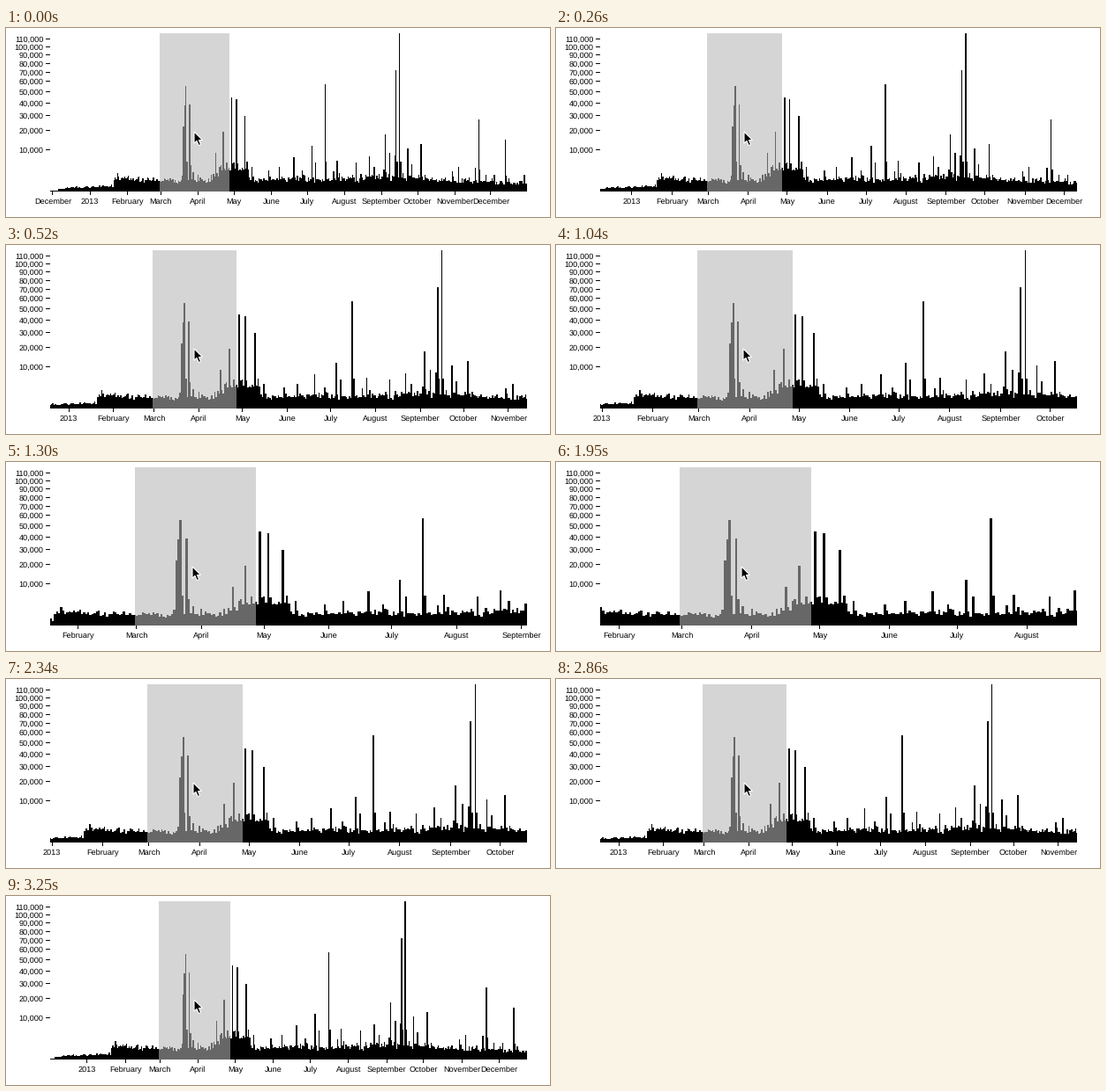
These frames come from a looping animation (616 px wide and 215 px high, 4450 ms). A matplotlib script:

```python
import numpy as np
import matplotlib.pyplot as plt
from matplotlib.animation import FuncAnimation
from matplotlib.patches import Polygon, Rectangle

W, H, DPI = 616, 215, 100
LEFT, RIGHT, TOP, BASE = 50, 590, 6, 185.5
TICK_MS, STEP_MS, LOOP_MS = 10, 130, 4450
LAST_STEP, TURN = 25, 13
FOCUS_X, FOCUS_DAY = 212.2, 86.2   # zoom keeps this day under the pointer
BRUSH = np.array([58.1, 116.25])   # days since 1 January 2013
LINE = dict(color="black", lw=72 / DPI, antialiased=False,
            solid_capstyle="butt", snap=False)

plt.rcParams.update({
    "font.family": "Liberation Sans",
    "font.size": 9.2 * 72 / DPI,
    "text.hinting": "none",
})

MONTH_NAMES = ("January February March April May June July August "
               "September October November December").split()

# Busiest days and the tops of their bars in pixels.
PEAKS = {78: 112, 79: 88, 80: 66, 83: 87, 111: 118, 118: 79, 122: 81,
         129: 100, 185: 134, 196: 63.5, 246: 121, 255: 48.5, 258: TOP,
         276: 132, 324: 104.5, 346: 127}


def month_starts():
    """Yield (day, label) for each month from December 2012 on."""
    months = np.arange("2012-12", "2014-01", dtype="datetime64[M]")
    offsets = months.astype("datetime64[D]") - np.datetime64("2013-01-01")
    for month, day in zip(months.astype(int), offsets.astype(int)):
        yield day, MONTH_NAMES[month % 12] if month % 12 else str(1970 + month // 12)


def bar_tops(days):
    """Slowly varying level with noise, random busy days and the known peaks."""
    rng = np.random.default_rng(7)
    level = np.interp(days, [-26, -14, 19, 21, 60, 98, 113, 128, 135, 200, 250, 300, 366],
                      [2.5, 4.5, 6, 15, 12, 13, 27, 26, 13, 14, 17, 12, 9])
    heights = level * np.exp(rng.normal(0, .16, days.size))
    busy = (days > 85) & (rng.random(days.size) < .1)
    heights[busy] *= rng.uniform(1.3, 2.5, busy.sum())
    for day, top in PEAKS.items():
        i = day - days[0]
        heights[i] = BASE - top
        if day + 1 not in PEAKS:
            heights[i + 1] = max(heights[i + 1], min(.3 * heights[i], 34))
    return np.round(BASE - heights)


def zoom_scale(level):
    """Pixels per day: one soft scroll, then a faster one that eases out."""
    u = np.clip(level / 8, 0, 1) ** .824
    v = np.clip((level - 8) / 5, 0, 1)
    return np.exp(.3067 + .313 * u * u * (3 - 2 * u) + .379 * (1 - (1 - v) ** 2))


def value_y(value):
    return BASE - 47.5 * (value / 10000) ** .538


def to_x(day, scale):
    return FOCUS_X + scale * (day - FOCUS_DAY)


def segments(pairs):
    """Flatten line segments into one path with gaps."""
    xs, ys = [], []
    for (x0, y0), (x1, y1) in pairs:
        xs += [x0, x1, np.nan]
        ys += [y0, y1, np.nan]
    return xs, ys


days = np.arange(-26, 367)
tops = bar_tops(days)
columns = np.arange(LEFT, RIGHT)
column_edges = np.repeat(np.arange(LEFT, RIGHT + 1), 2)
months = list(month_starts())

fig = plt.figure(figsize=(W / DPI, H / DPI), dpi=DPI, facecolor="white")
ax = fig.add_axes([0, 0, 1, 1])
ax.set(xlim=(0, W), ylim=(H, 0))
ax.axis("off")

bars = ax.add_patch(Polygon([(0, 0)] * 3, fc="black", ec="none",
                            antialiased=False, snap=False))
brush = ax.add_patch(Rectangle((0, TOP), 1, 180, fc="#b6b6b6", ec="none",
                               alpha=.57, antialiased=False, zorder=3))
ax.plot([LEFT, RIGHT], [BASE, BASE], **LINE)
month_ticks, = ax.plot([], [], **LINE)

values = range(10000, 110001, 10000)
rows = [np.floor(value_y(v)) + .5 for v in values]
ax.plot(*segments([((45, y), (50, y)) for y in rows]), **LINE)
for value, y in zip(values, rows):
    ax.text(42.5, y + 3.3, f"{value:,}", ha="right", va="baseline")
labels = [ax.text(0, 200, name, ha="center", va="baseline") for _, name in months]

ARROW = np.array([(0, 0), (0, 13.2), (3, 10.4), (5.2, 15.6), (7.6, 14.6),
                  (5.4, 9.5), (9.5, 9.5)])
pointer = ax.add_patch(Polygon(ARROW, fc="black", ec="white", lw=.8, zorder=5))


def draw(frame):
    step = min(frame * TICK_MS // STEP_MS, LAST_STEP)
    level = TURN - abs(TURN - step)
    scale = zoom_scale(level)

    # One bar top per pixel column keeps narrow bars crisp.
    index = np.round(FOCUS_DAY + (columns + .5 - FOCUS_X) / scale).astype(int) - days[0]
    column_tops = np.where(index < 0, BASE + .5, tops[np.clip(index, 0, days.size - 1)])
    outline = np.concatenate([[186], np.repeat(column_tops, 2), [186]])
    bars.set_xy(np.column_stack([column_edges, outline]))

    x0, x1 = np.round(to_x(BRUSH, scale))
    brush.set_x(x0)
    brush.set_width(x1 - x0)

    ticks = []
    for (day, _), label in zip(months, labels):
        x = to_x(day, scale)
        shown = LEFT <= x <= RIGHT
        label.set_visible(shown)
        label.set_x(x)
        if shown:
            px = np.floor(x) + .5
            ticks.append(((px, 186), (px, 190)))
    month_ticks.set_data(*segments(ticks))

    drift = np.clip((level - 4) / 8, 0, 1)
    pointer.set_xy(ARROW + np.round((213 - 3 * drift, 118 + drift)))
    return bars, brush, month_ticks, pointer, *labels


anim = FuncAnimation(fig, draw, frames=LOOP_MS // TICK_MS, interval=TICK_MS,
                     repeat=True, repeat_delay=0, blit=False)
plt.show()
```
